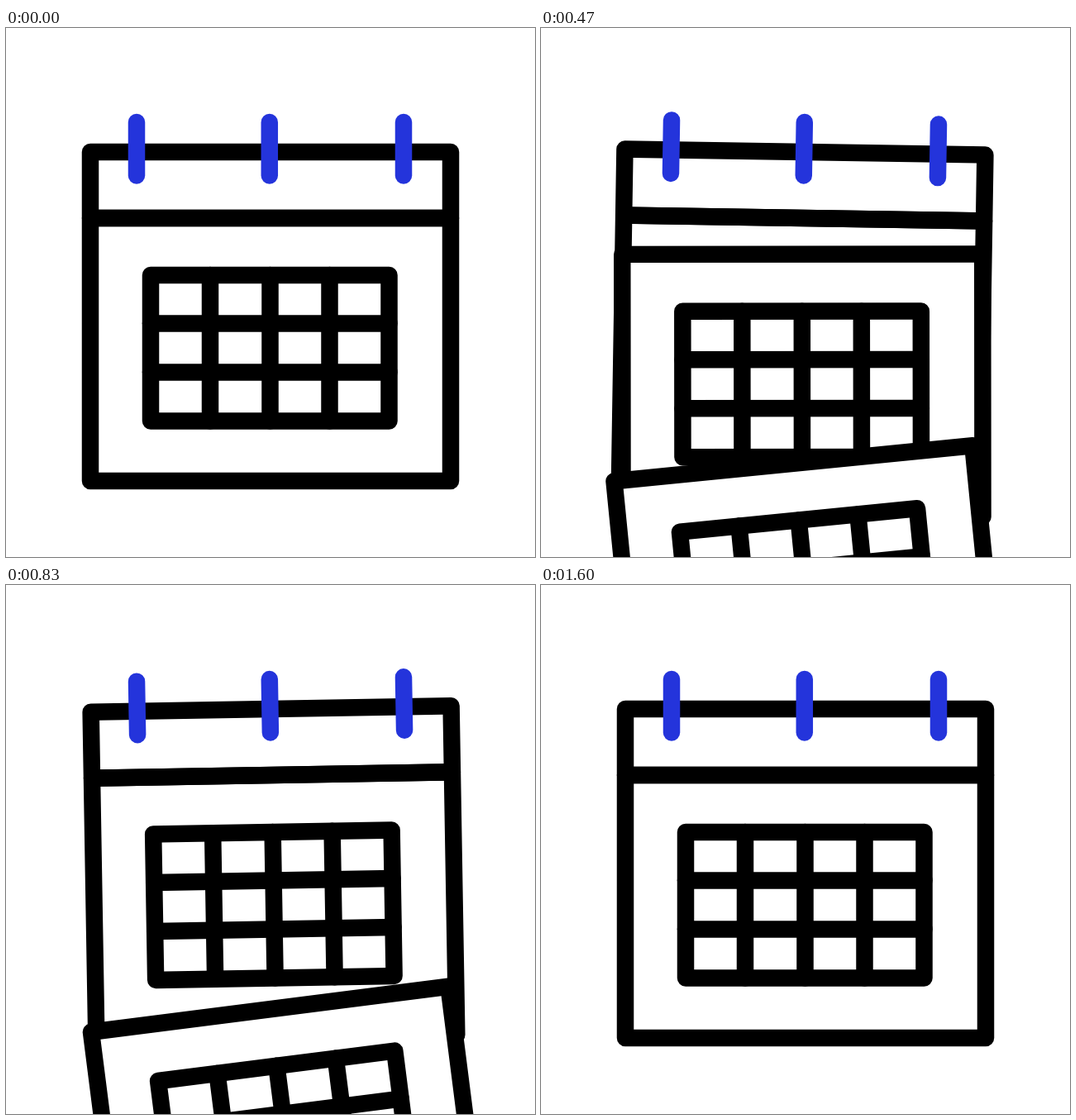
An HTML page with a canvas that plays this animation: 640x640 px, repeating every 1.67 s.

```html
<!DOCTYPE html>
<html lang="en">
<head>
<meta charset="utf-8">
<title>Calendar</title>
<style>
  html, body { margin: 0; width: 100%; height: 100%; overflow: hidden; background: #fff; }
  canvas { display: block; width: 100vmin; height: 100vmin; }
</style>
</head>
<body>
<canvas id="stage" width="640" height="640"></canvas>
<script>
const ctx = document.getElementById('stage').getContext('2d');
const LOOP = 1670;
const BLACK = '#000';
const BLUE = '#2434db';
const RAD = Math.PI / 180;

// All times below are in ticks of 1/30 s.
const SWING = [[2.3, 0], [9.5, 10], [18.45, -8], [30.2, 4], [34.3, 0]];
const FALLS = [
  { start: 15.54, length: 21.2 },
  { start: 10.54, length: 21.2 },
  { start: 3.67, length: 22.5 }
];
const FALL_HEIGHT = 680;
const FALL_TILT = -0.0222; // degrees per pixel fallen
const DRAW = [25.9, 40.8];
const ERASE = [38, 48];

const progress = (t, from, to) => Math.min(1, Math.max(0, (t - from) / (to - from)));
const smooth = u => u * u * (3 - 2 * u);
const sine = u => (1 - Math.cos(Math.PI * u)) / 2;

function swingAngle(t) {
  let angle = 0;
  for (let i = 1; i < SWING.length; i++) {
    const [t0, a0] = SWING[i - 1];
    const [t1, a1] = SWING[i];
    if (t >= t0) angle = a0 + (a1 - a0) * smooth(progress(t, t0, t1));
  }
  return angle;
}

function rotateAround(x, y, degrees) {
  ctx.translate(x, y);
  ctx.rotate(degrees * RAD);
  ctx.translate(-x, -y);
}

function line(x0, y0, x1, y1) {
  ctx.beginPath();
  ctx.moveTo(x0, y0);
  ctx.lineTo(x1, y1);
  ctx.stroke();
}

function drawPage() {
  ctx.fillStyle = '#fff';
  ctx.fillRect(102, 230, 436, 318);
  ctx.strokeRect(102, 230, 436, 318);
  ctx.strokeRect(175, 299, 288.5, 176.5);
  for (const x of [247, 319.5, 391.5]) line(x, 299, x, 475.5);
  for (const y of [357.5, 416.5]) line(175, y, 463.5, y);
}

function drawFallingPage(t, { start, length }) {
  const drop = FALL_HEIGHT * sine(progress(t, start, start + length));
  if (drop === 0 || drop === FALL_HEIGHT) return;
  ctx.save();
  ctx.translate(0, drop);
  rotateAround(319.8, 299, FALL_TILT * drop);
  drawPage();
  ctx.restore();
}

function drawCalendar(t) {
  ctx.save();
  rotateAround(319, 114, swingAngle(t));
  ctx.strokeStyle = BLACK;
  drawPage();
  for (const fall of FALLS) drawFallingPage(t, fall);
  ctx.strokeRect(102, 150, 436, 80);
  ctx.strokeStyle = BLUE;
  for (const x of [158, 318.8, 481]) line(x, 114, x, 178.5);
  ctx.restore();
}

function drawCircle(t) {
  const drawn = smooth(progress(t, ...DRAW));
  const erased = smooth(progress(t, ...ERASE));
  if (drawn <= erased) return;
  const origin = -103 + 168 * drawn;
  ctx.strokeStyle = BLUE;
  ctx.beginPath();
  ctx.arc(206.3, 325.6, 64.3, (origin + 360 * erased) * RAD, (origin + 360 * drawn) * RAD);
  ctx.stroke();
}

function render(now) {
  const tick = Math.floor((now % LOOP) * 0.03 + 0.15);
  ctx.fillStyle = '#fff';
  ctx.fillRect(0, 0, 640, 640);
  ctx.lineWidth = 20.5;
  ctx.lineCap = ctx.lineJoin = 'round';
  drawCalendar(tick);
  drawCircle(tick);
  requestAnimationFrame(render);
}
requestAnimationFrame(render);
</script>
</body>
</html>
```
